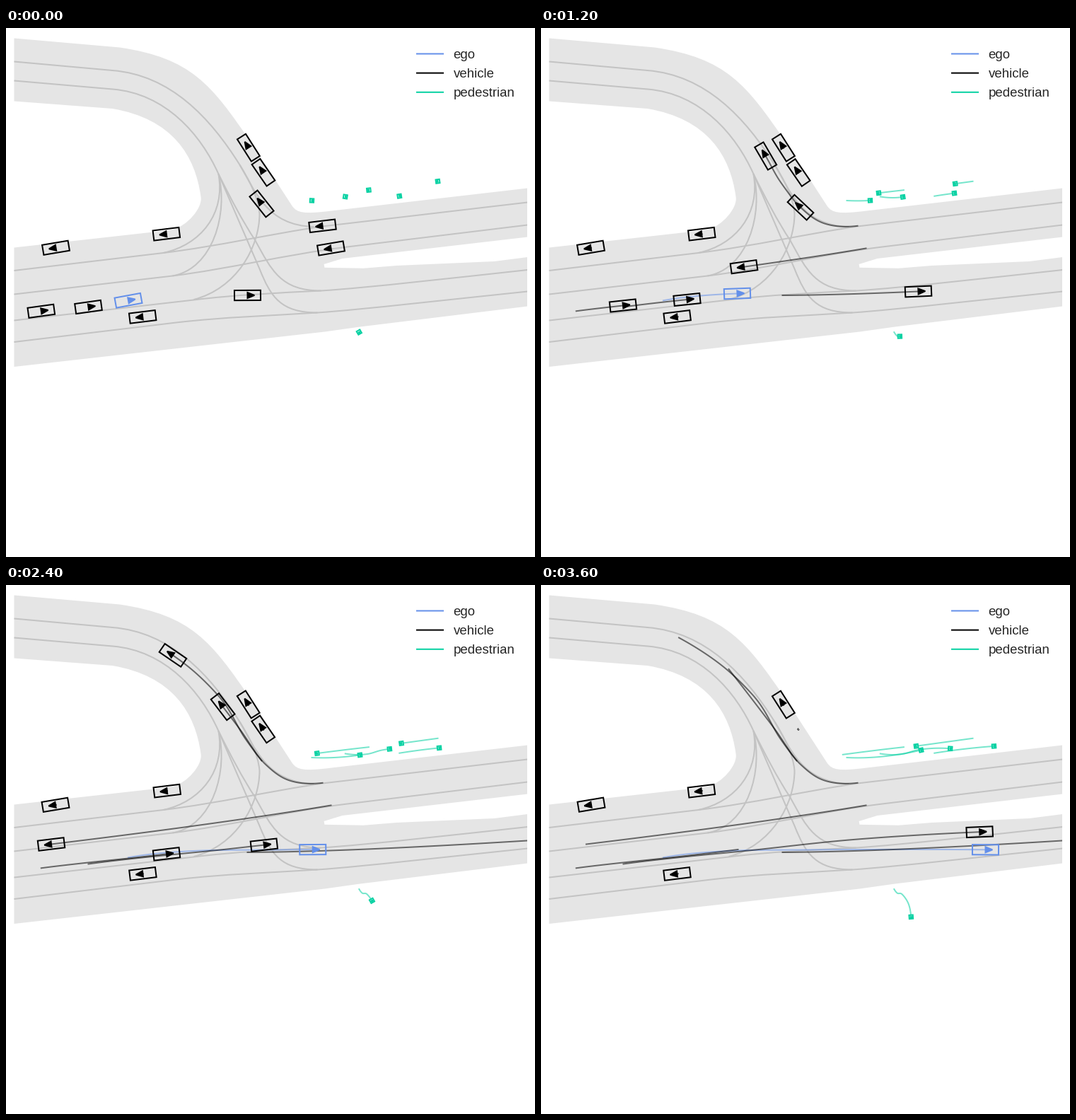
Write a matplotlib script that moves like this. It is 748 by 748 pixels and loops after 3.8 s.

```python
import matplotlib.pyplot as plt
import numpy as np
from matplotlib.animation import FuncAnimation
from matplotlib.patches import PathPatch, Polygon
from matplotlib.path import Path

SIZE, PAD = 748, 11
FRAMES, STEP_MS = 19, 200
PX = 0.72  # points per pixel at 100 dpi
ROAD, LANE, INK = "#e5e5e5", "#c3c3c3", "#262626"
COLORS = {"ego": "#6490ea", "vehicle": "#000000", "pedestrian": "#06d1a2"}
BOXES = {"ego": (37, 14.2), "vehicle": (37, 14.2), "pedestrian": (5.3, 5.3)}
rng = np.random.default_rng(4)


def make_path(*steps):
    """Pairs are straight steps, six numbers are a cubic Bezier step."""
    verts, codes = [], []
    for step in steps:
        pts = np.reshape(step, (-1, 2))
        verts.extend(pts)
        codes += [Path.CURVE4 if len(pts) == 3 else Path.LINETO] * len(pts)
    codes[0] = Path.MOVETO
    return Path(verts, codes)


ROAD_EDGE = make_path(
    (11, 14), (160, 27), (262, 42, 290, 80, 345, 160), (404, 251),
    (411, 261, 420, 263, 460, 258), (737, 226),
    (737, 295), (475, 325.5), (449, 333.5), (450, 338.3), (505, 339.3),
    (552, 335.5), (690, 329.5), (737, 323.5),
    (737, 393), (500, 422), (450, 429), (11, 478.5),
    (11, 310), (208, 288), (235, 284.5), (255, 280, 278, 254, 275, 238),
    (267, 180, 235, 128, 150, 113.5), (11, 103))

OUTER, INNER = (330, 193), (300, 206)  # where the north lanes fan out
LANES = [
    # through lanes
    make_path((737, 246), (447, 280), (372, 291, 300, 308, 222, 317.5), (11, 342.5)),
    make_path((737, 278), (478, 309.5), (395, 320, 315, 340, 235, 350), (11, 376)),
    make_path((11, 413), (265, 384), (320, 377, 385, 374, 445, 371),
              (510, 367, 640, 352, 737, 341.5)),
    make_path((11, 443.5), (240, 416), (310, 408, 370, 406.5, 440, 402),
              (500, 398, 640, 382, 737, 372)),
    # north lanes
    make_path((11, 47), (150, 59.5), (232, 66, 288, 126, *OUTER)),
    make_path((11, 74), (150, 86), (225, 92, 275, 150, *INNER)),
    # turns
    make_path(OUTER, (343, 214, 356, 238, 358, 262), (358, 310, 325, 368, 265, 383.5)),
    make_path(OUTER, (352, 230, 368, 279, 435, 280.5)),
    make_path(INNER, (310, 262, 275, 306, 222, 317.5)),
    make_path(INNER, (314, 262, 292, 340, 235, 350)),
    make_path(INNER, (318, 242, 333, 271, 352, 300), (375, 342, 388, 371, 445, 371)),
    make_path(INNER, (358, 340), (374, 380, 388, 402, 440, 402)),
]


def spline(keys, values, t):
    """Cubic Hermite curve through values at uneven keys."""
    k, v = np.asarray(keys, float), np.asarray(values, float)
    m = np.gradient(v, k, edge_order=2)
    t = np.clip(t, k[0], k[-1])
    i = np.clip(np.searchsorted(k, t, side="right") - 1, 0, len(k) - 2)
    h = k[i + 1] - k[i]
    u = (t - k[i]) / h
    return ((1 + 2 * u) * (1 - u) ** 2 * v[i] + u * (1 - u) ** 2 * h * m[i]
            + u * u * (3 - 2 * u) * v[i + 1] + u * u * (u - 1) * h * m[i + 1])


def moving(*waypoints):
    """Smooth motion through (frame, x, y), heading along the path."""
    keys, xs, ys = zip(*waypoints)

    def track(t):
        return np.array([spline(keys, xs, t), spline(keys, ys, t)])

    def heading(t):
        dx, dy = track(t + 0.05) - track(t - 0.05)
        return np.arctan2(dy, dx)

    return track, heading


def parked(x, y, degrees, wobble=0.35):
    """Standing still, with a little sensor noise."""
    noise = rng.normal(0, wobble, FRAMES)
    a = np.radians(degrees)

    def track(t):
        d = np.interp(t, np.arange(FRAMES), noise)
        return np.array([x + d * np.cos(a), y + d * np.sin(a)])

    return track, lambda t: a


class Agent:
    """A road user: outlined box, heading triangle and the path behind it."""

    def __init__(self, kind, motion, last=FRAMES - 1):
        self.track, self.heading = motion
        self.last = last
        color = COLORS[kind]
        w, h = BOXES[kind]
        self.outline = np.array([(-w, -h), (w, -h), (w, h), (-w, h)]) / 2
        self.arrow = np.array([(0, -0.28 * h), (0.265 * w, 0), (0, 0.28 * h)])
        self.trail, = ax.plot([], [], color=color, lw=2 * PX, alpha=0.55, zorder=3)
        style = dict(ec=color, lw=2 * PX, zorder=4)
        self.box = ax.add_patch(Polygon(self.outline, fill=False, **style))
        self.tip = ax.add_patch(Polygon(self.arrow, fc=color, **style))

    def update(self, frame):
        end = min(frame, self.last)
        x, y = self.track(np.linspace(0, end, 4 * end + 1))
        self.trail.set_data(x, y)
        a = self.heading(end)
        turn = np.array([(np.cos(a), np.sin(a)), (-np.sin(a), np.cos(a))])
        shown = frame <= self.last and x[-1] < SIZE - PAD
        for patch, shape in ((self.box, self.outline), (self.tip, self.arrow)):
            patch.set_xy(shape @ turn + (x[-1], y[-1]))
            patch.set_visible(shown)


fig = plt.figure(figsize=(SIZE / 100, SIZE / 100), dpi=100, facecolor="white")
side = 1 - 2 * PAD / SIZE
ax = fig.add_axes([PAD / SIZE, PAD / SIZE, side, side])
# whole numbers fall on pixel centres
ax.set_xlim(PAD - 0.5, SIZE - PAD - 0.5)
ax.set_ylim(SIZE - PAD - 0.5, PAD - 0.5)
ax.axis("off")

ax.add_patch(PathPatch(ROAD_EDGE, fc=ROAD, lw=0, zorder=1))
for lane in LANES:
    ax.add_patch(PathPatch(lane, fill=False, ec=LANE, lw=2 * PX, zorder=2))

for row, (name, color) in enumerate(COLORS.items()):
    y = 36 + 27.15 * row
    ax.plot([579.5, 618.5], [y, y], color=color, lw=2 * PX, snap=False,
            solid_capstyle="butt", zorder=5)
    ax.text(632, y + 6.4, name, family="Liberation Sans", fontsize=13.4,
            color=INK, va="baseline", zorder=5)

agents = [
    Agent("ego", moving((0, 172.5, 384.8), (6, 277, 375), (10, 374.3, 374),
                        (14, 496.5, 373.4), (18, 628, 373.8))),
    Agent("vehicle", parked(342.3, 168.5, -122.5)),
    Agent("vehicle", parked(363.3, 203.5, -124.5), last=15),
    Agent("vehicle", parked(69.2, 310.4, 170.5, wobble=1)),
    Agent("vehicle", parked(226.8, 290.7, 173)),
    Agent("vehicle", parked(192.4, 407.9, 173)),
    # heading north-west
    Agent("vehicle", moving((0, 361, 248), (3, 338, 217), (8, 298, 154),
                            (11, 253.5, 112), (14, 194.5, 74)), last=14),
    Agent("vehicle", moving((0, 447, 279.3), (3, 400.5, 276), (6, 366.5, 253.2),
                            (10, 329.5, 202.5), (15, 265, 118.5)), last=15),
    # through traffic
    Agent("vehicle", moving((0, 459, 311), (6, 286.5, 337.2), (12, 63.5, 366)), last=12),
    Agent("vehicle", moving((0, 341, 377.5), (6, 533, 372), (11, 749, 360.2)), last=11),
    Agent("vehicle", moving((0, 49.3, 399.8), (6, 115.5, 392), (10, 190.7, 384),
                            (15, 278, 373.5)), last=15),
    Agent("vehicle", moving((0, 116, 394), (6, 206, 383.5), (10, 296, 374.7),
                            (14, 443.5, 359.3), (18, 619.7, 348.7))),
    # on foot
    Agent("pedestrian", moving((0, 432, 243.5), (6, 465, 243.4), (18, 537, 233))),
    Agent("pedestrian", moving((0, 479.3, 238), (6, 511.2, 238.4), (10, 531, 233),
                               (18, 578.2, 230.7))),
    Agent("pedestrian", moving((0, 512.4, 228.7), (6, 477, 232.8), (14, 426.3, 239.3)),
          last=14),
    Agent("pedestrian", moving((0, 555.8, 237.2), (6, 584, 233.1), (18, 640, 227.4))),
    Agent("pedestrian", moving((0, 610, 216.3), (6, 585.2, 219.7), (18, 530, 227.3))),
    Agent("pedestrian", moving((0, 498.8, 429.6), (3, 502.8, 434.8), (8, 509.8, 436.6),
                               (14, 519.9, 452.5), (18, 522.8, 468.8))),
]


def draw(frame):
    for agent in agents:
        agent.update(frame)
    return []


anim = FuncAnimation(fig, draw, frames=FRAMES, interval=STEP_MS,
                     repeat=True, repeat_delay=0, blit=False)
plt.show()
```
